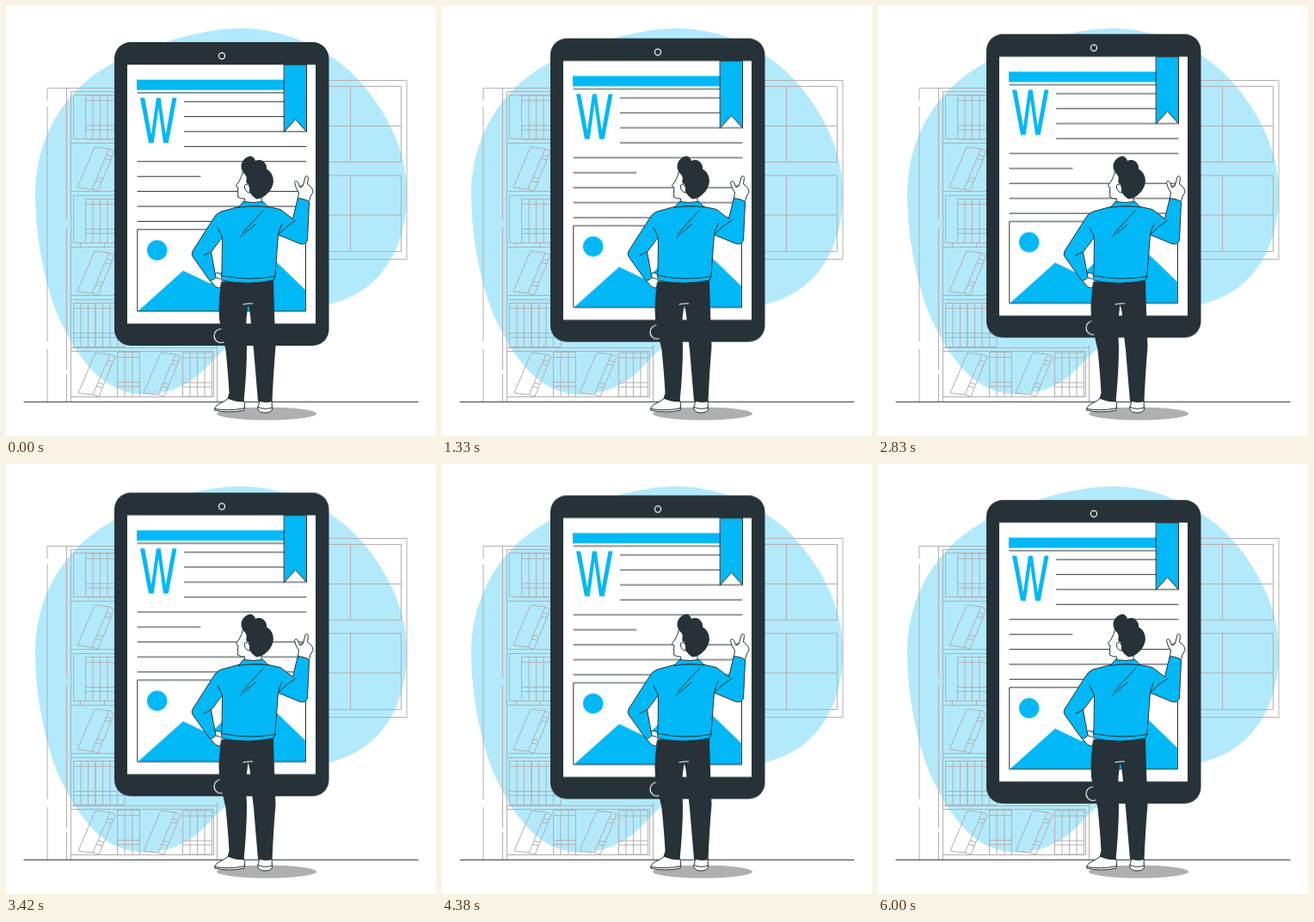
These frames come from a looping animation (500 px wide and 500 px high, 6040 ms). An HTML page:

```html
<!DOCTYPE html>
<html lang="en">
<head>
<meta charset="utf-8">
<title>Reading on a tablet</title>
<style>
  html, body { margin: 0; width: 100%; height: 100%; overflow: hidden; background: #fff; }
  svg { display: block; width: 100vw; height: 100vh; }
  .blue { fill: #02b8f6; }
  .dark { fill: #263238; }
  .thin { fill: none; stroke: #b4afaf; stroke-width: 1; }
  .ink { stroke: #263238; stroke-width: 1; stroke-linecap: round; stroke-linejoin: round; }
  .line { fill: none; }
  .white { fill: #fff; }
  #tablet { animation: float 6.04s linear infinite; }
  @keyframes float { 50% { transform: translateY(-10px); } }
</style>
</head>
<body>
<svg viewBox="0 0 500 500">
  <defs>
    <g id="lean">
      <path d="M0 47L20 0L37 2L43 5L24 51L17 49L0 47M37 2L17 49"/>
      <path d="M34 9l7 2M32 13l7 2M23 35l7 2M21 39l7 2"/>
    </g>
    <g id="books">
      <path d="M0 0H34V51H0ZM8.500 0V51M17 0V51M25.500 0V51M0 6H34M0 35H34M0 40H34"/>
    </g>
    <g id="pair">
      <path d="M0 0H26V52H0ZM8.500 0V52M17.500 0V52M0 6H26M0 35H26M0 40H26"/>
    </g>
  </defs>

  <path class="blue" opacity=".3" d="M273 26C240 26 206 35 172 46C146 54 112 69 85 95C52 127 34 172 34 218C34 268 45 330 66 372C84 408 107 440 141 449C168 456 202 449 226 427C241 413 250 400 270 387C305 365 340 359 376 347C446 330 467 268 466 215C466 165 438 112 399 75C363 43 316 26 273 26Z"/>

  <g class="thin" id="shelf">
    <path d="M48 110V95.500H130M48 117V390M48 399V460M70.500 95V249M70.500 257V423M70.500 428V460M75.500 99V460"/>
    <path d="M75.500 99.500H130M78.500 103V154.500H130M78.500 103.500H130M75.500 159.500H130M75.500 215.500H130M78.500 220.500H130M78.500 220V275.500H130M75.500 280.500H130M86.500 276v4M114.500 276v4M75.500 336.500H130M75.500 341.500H130M75.500 397.500H246M75.500 401.500H241.500V454.500H75.500M245.500 394V460"/>
    <use href="#books" x="92.500" y="104"/>
    <use href="#lean" x="83" y="164"/>
    <use href="#books" x="92.500" y="224.500"/>
    <use href="#lean" x="83" y="285"/>
    <use href="#books" x="78.500" y="345.500"/>
    <use href="#books" x="104" y="345.500"/>
    <use href="#lean" x="84" y="403"/>
    <use href="#pair" x="129.500" y="402.500"/>
    <use href="#lean" x="160" y="403"/>
    <use href="#books" x="205.500" y="403"/>
  </g>

  <g class="thin" id="window">
    <path d="M360 86.500H466V294.500H360"/>
    <path d="M360 93.500H459.500V181.500H360M360 139.500H459.500M400.500 94V181"/>
    <path d="M360 197H459.500V285.500H360M360 243H459.500M400.500 197V285"/>
  </g>

  <path class="ink" d="M21 460.300H479"/>
  <ellipse cx="303" cy="474" rx="58" ry="7.500" fill="#afafaf"/>

  <g id="tablet">
    <rect class="dark" x="126" y="42" width="249.500" height="353" rx="19"/>
    <rect class="white" x="141" y="68.300" width="219" height="301"/>
    <g class="line" stroke="#fff" stroke-width="1.200">
      <circle cx="251" cy="58" r="3.600"/>
      <circle cx="250" cy="383.500" r="8"/>
    </g>
    <rect class="blue" x="152" y="85.700" width="180" height="12"/>
    <path class="ink" d="M153 100.900H349M207.500 111.200H349M207.500 128.600H349M207.500 146H349M207.500 163.400H349M153 180.800H349M153 198.200H226M153 215.600H349M153 233H349M153 250.400H349"/>
    <path class="blue" d="M156 106.700h5.200L169 149.500 174.900 106.700h4.800L185.700 149.500 193.500 106.700h5L188.700 159.200h-5.700L177.300 118.500 171.700 159.200H166Z"/>
    <path class="blue ink" d="M323.500 68.300H349.500V146.200L336.500 131.700L323.500 146.200Z"/>
    <rect class="white" x="153.200" y="259.900" width="195.300" height="95"/>
    <path class="blue" d="M153.200 354.900L206 307.700L237 322.500L288 272L348.500 330.500V354.900Z"/>
    <circle class="blue" cx="175.700" cy="284" r="11.700"/>
    <rect class="ink line" x="153.200" y="259.900" width="195.300" height="95"/>
  </g>

  <g id="reader">
    <g class="ink white">
      <path d="M259 456Q254 460 247 463Q242 466 242.500 470Q259 474 277 470Q279 463 276 457Z"/>
      <path d="M295 458Q294 463 292.500 468Q294 473 301 473Q308 473 309.500 469L309 459Z"/>
      <path class="line" d="M243 468.500Q260 471.500 278 467.500M293 466.500Q301 470 309.500 467"/>
    </g>
    <path class="dark" d="M252 318Q246 336 248 364Q252 385 255.500 400Q258.500 430 259.500 450L257.500 456.500Q268 461 276.500 460Q280 425 280 397Q279 376 279.500 364L281.500 347Q284 355 284.500 364Q286 384 288 400L293 459.500Q302 462 309.500 460Q311 425 313.500 396Q312 360 311 318Z"/>
    <path class="line" stroke="#fff" stroke-width="1" d="M275.500 347Q281 345.500 287 346"/>

    <path class="ink white" d="M237 319L241.500 324Q246 329 249.500 327.500L250.500 321L262 320.500Q259 315 254 313.500L246 310Q242 311 237 319Z"/>
    <path class="ink line" d="M244 316Q249 316 252 320"/>

    <path class="ink white" d="M339 226L340.500 217Q336.500 211 335.500 205.500Q336.500 202 339.500 205L341.500 210.500Q343.500 208 345.500 208.500L348 199Q350 196 351.500 199.500L350.500 207Q357 211 357 216.500Q354 220 352.500 227Z"/>
    <path class="ink line" d="M341.500 210.500Q344 212 345.500 208.500"/>

    <path class="ink white" d="M276 191Q274 199 271 204L267.500 208.500Q268 211 270 211L269.500 215Q270 219 269.500 222Q273 224.500 277.500 224L278 232H297V216L290 190Z"/>
    <path class="dark" d="M277 195Q272 189 274 183Q277 175.500 284 174.500Q288.500 175 290 180Q295 178 299 180.500Q303.500 184 303 189.500Q311 194 311 204Q310 213 303 219Q298 224 291 224.500Q286 221 283.500 217L282 207Q278.500 207 279.500 202Q280.500 198 277 195Z"/>
    <path class="ink white" d="M283 210Q280 205.500 277.500 208.500Q277 214 281 216.500L283.500 217Z"/>

    <path class="blue ink" d="M272 233L250 239Q244 241 240 249L217 285Q215 289 217.500 292L234.500 316L237.500 319.500Q242 318.500 244 315.500L238.500 286L251.500 269L251 309Q249 317 253 319.500Q282 325 310.500 319Q314 316 313 311L316.500 266L342 276.500Q349 278 350.500 272L352.500 229Q352 225 339.500 223.500Q337 232 333.500 247.500L319 236.500L303 233Z"/>
    <path class="blue ink" d="M270.500 234.500L276 227.500Q287 229.500 299 227.500L305 234Q288 231 270.500 234.500Z"/>
    <g class="ink line">
      <path d="M251.500 313.500Q282 320 312.500 314.500"/>
      <path d="M300 237L274 265M290 254L272 269.500"/>
      <path d="M251.500 269Q249 263 246 258M238.500 286L230 290M316.500 266Q318 259 321 253M316.500 266Q324 257 337 249"/>
    </g>
  </g>
</svg>
</body>
</html>
```
